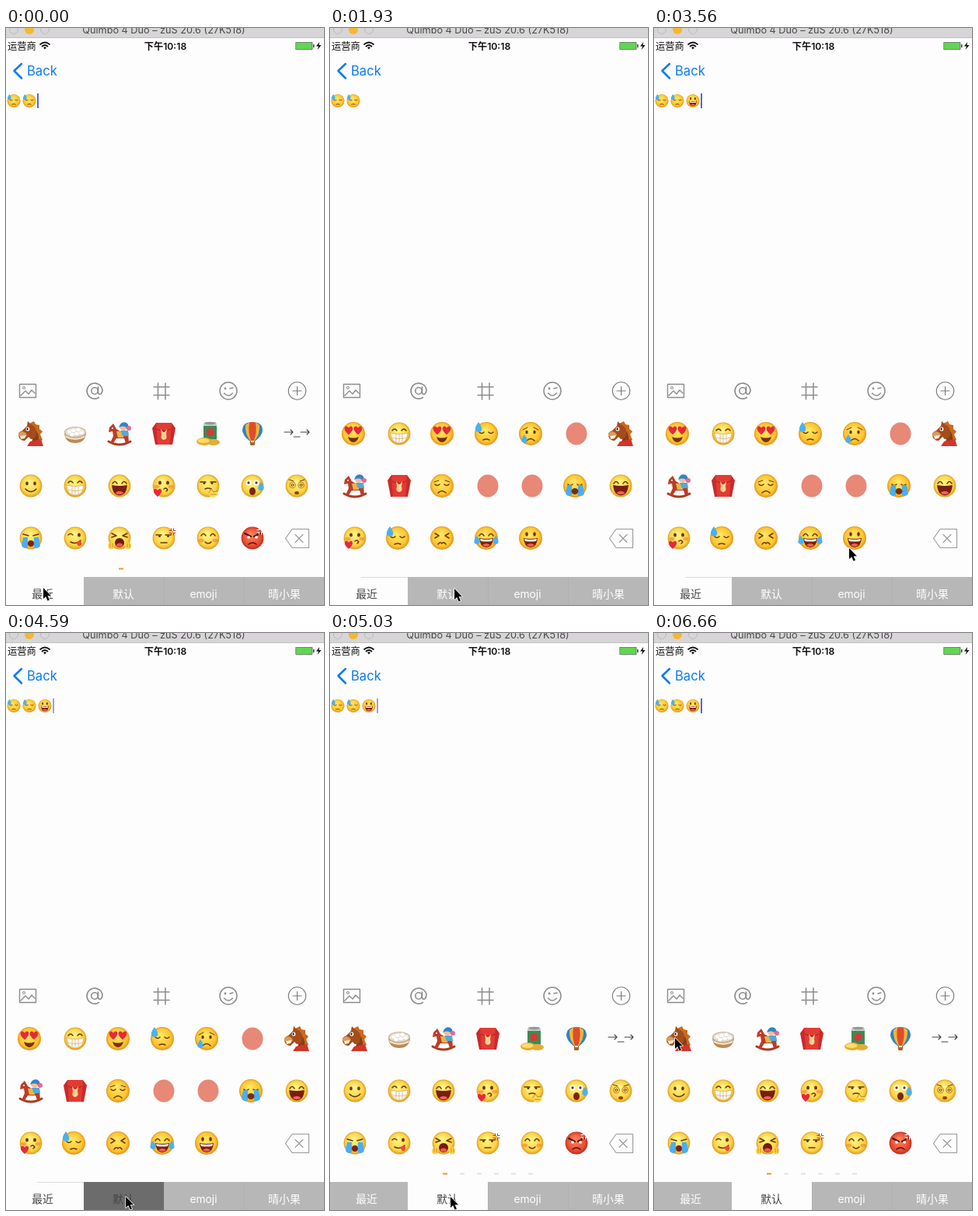
Animation of 409 by 741 pixels, one loop 8 s. Source, as an HTML page with a canvas:

```html
<!DOCTYPE html>
<html lang="zh-CN">
<head>
<meta charset="utf-8">
<style>
html, body { margin: 0; width: 100%; height: 100%; overflow: hidden; background: #fdfdfd; }
canvas { display: block; width: 409px; height: 741px; }
</style>
</head>
<body>
<canvas id="stage"></canvas>
<script>
const LOOP = 8000, TICK = 147.6;
const canvas = document.getElementById('stage');
const ctx = canvas.getContext('2d');
const ratio = window.devicePixelRatio || 1;
canvas.width = 409 * ratio;
canvas.height = 741 * ratio;

const BROWN = '#68370c', GRAY = '#8c8c8c', BLUE = '#0b7bf5';

// Drawing helpers
function fill(d, color) {
  ctx.fillStyle = color;
  ctx.fill(new Path2D(d));
}
function line(d, color = BROWN, width = 1.5) {
  ctx.strokeStyle = color;
  ctx.lineWidth = width;
  ctx.stroke(new Path2D(d));
}
function oval(x, y, rx, ry, color) {
  ctx.fillStyle = color;
  ctx.beginPath();
  ctx.ellipse(x, y, rx, ry, 0, 0, 7);
  ctx.fill();
}
function ring(x, y, r, color = GRAY, width = 1.3) {
  ctx.strokeStyle = color;
  ctx.lineWidth = width;
  ctx.beginPath();
  ctx.arc(x, y, r, 0, 7);
  ctx.stroke();
}
function rect(x, y, w, h, color) {
  ctx.fillStyle = color;
  ctx.fillRect(x, y, w, h);
}
function text(str, x, y, size, color, align = 'center', weight = 400) {
  ctx.font = `${weight} ${size}px Inter, "Noto Sans CJK SC", "Noto Sans CJK", sans-serif`;
  ctx.textAlign = align;
  ctx.fillStyle = color;
  ctx.fillText(str, x, y);
}
function at(x, y, draw, scale = 1) {
  ctx.save();
  ctx.translate(x, y);
  ctx.scale(scale, scale);
  draw();
  ctx.restore();
}

// Face parts, drawn around the origin with a radius of about 15
function ball(inner = '#fff48a', mid = '#fbd344', edge = '#dc9420', r = 14.4) {
  const g = ctx.createRadialGradient(-2, -5, 1, 0, 0, r + .4);
  g.addColorStop(0, inner);
  g.addColorStop(0.75, mid);
  g.addColorStop(1, edge);
  oval(0, 0, r, r, g);
}
const glossy = () => ball('#ffe765', '#fdc52f', '#e08c18', 15);
const pair = (x, y, rx, ry, color = BROWN) => {
  oval(-x, y, rx, ry, color);
  oval(x, y, rx, ry, color);
};
const blush = (y = 3) => pair(9, y, 3.5, 2.3, 'rgba(245,110,50,.5)');
const happyEyes = () => line('M-9-3Q-6-8-3-3M3-3Q6-8 9-3');
const flatEyes = () => line('M-9-2Q-6 1-3-2M3-2Q6 1 9-2');
const sadMouth = () => line('M-5 9Q0 4 5 9');
const heart = () => fill('M0 5C-8-1-5-6-2-5Q0-4 0-3Q0-4 2-5C5-6 8-1 0 5Z', '#e6283c');
const drop = () => fill('M0-7Q6 1 3.5 4.5Q0 7-3.5 4.5Q-6 1 0-7Z', '#4cb0ee');
const angerMark = color => line('M-4-1.5H-1.5V-4M1.5-4V-1.5H4M-4 1.5H-1.5V4M1.5 4V1.5H4', color, 1.2);
const openMouth = () => {
  fill('M-9 0Q0 2 9 0Q8 12 0 12Q-8 12-9 0Z', '#7b1d12');
  fill('M-5 9Q0 5 5 9Q0 13-5 9Z', '#ee6553');
};
const toothMouth = () => {
  openMouth();
  fill('M-8 1Q0 3 8 1L7 4Q0 5-7 4Z', '#fff');
};
const streams = () => fill('M-10-1H-4V12Q-9 15-12 10ZM10-1H4V12Q9 15 12 10Z', '#4aaef0');

const pic = {
  smile() { ball(); pair(5, -3, 1.8, 2.4); line('M-7 4Q0 11 7 4'); },
  grin() {
    ball(); line('M-9-4Q-6-8-3-4M3-4Q6-8 9-4');
    fill('M-11-1Q0 2 11-1Q10 12 0 12Q-10 12-11-1Z', '#fff');
    line('M-11-1Q0 2 11-1Q10 12 0 12Q-10 12-11-1ZM-9 5Q0 8 9 5M-4 1V11M0 1V11M4 1V11', '#d2a257', .7);
  },
  laugh() { ball(); happyEyes(); at(0, -1, openMouth, 1.1); },
  love() {
    ball(); blush(1); pair(5, -4, 2, 2.6); line('M0 4Q3 2 4 4Q6 5 3 7');
    at(-8, 9, heart);
  },
  think() {
    ball(); line('M-10-5H-3M3-5H10'); pair(5, -3.5, 1.5, 1.5); line('M-4 4Q0 2 4 4');
    fill('M1 9L4 4 7 8 12 7Q15 13 7 15Q1 15 1 9Z', '#ffdc58');
    line('M1 9L4 4 7 8 12 7M3 11H10', '#cb8020', 1);
  },
  shock() {
    ball(); pair(5, -4, 3.4, 3.8, '#fff'); pair(5, -4, 1.6, 1.8);
    oval(0, 7, 4, 5, '#7b2412'); at(11, 1, drop, .9);
  },
  dizzy() {
    ball(); line('M-10-8L-4-6M4-6L10-8', BROWN, 1);
    for (const x of [-5.5, 5.5]) { ring(x, -1, 3.8, '#b97922', 1); ring(x, -1, 1.5, BROWN, 1); }
    oval(0, 9, 3, 2, '#8c4518');
  },
  sob() { ball(); line('M-10-5L-3-3M10-5L3-3'); streams(); oval(0, 7, 4, 4, '#7c2315'); },
  tongue() {
    ball(); line('M-9-4Q-6-7-3-4'); oval(5, -4, 2, 2.6, BROWN);
    line('M-6 5Q1 9 7 3'); fill('M1 6Q5 2 8 5Q9 11 4 10Z', '#e74b45');
  },
  bawl() {
    ball(); line('M-10-6L-4-3-10-1M10-6L4-3 10-1');
    oval(0, 6, 6, 6, '#75180f'); oval(0, 9, 4, 2.5, '#e75b4c');
    for (const x of [-11, 11]) at(x, 10, () => { oval(0, 0, 4, 4.5, '#ffd449'); line('M-1-3V2M2-3V2', '#bf751f', .8); });
  },
  annoyed() {
    ball(); line('M-10-4H-3M2-4H9'); pair(5.5, -2.5, 1.5, 1.5); line('M-4 6H4');
    at(11, -8, () => angerMark('#d83932'));
  },
  shy() { ball(); happyEyes(); blush(); line('M-4 5Q0 9 4 5'); },
  furious() {
    ball('#ff8560', '#e94c32', '#b92b20'); line('M-10-6L-2-2M10-6L2-2', '#4c120c', 2);
    pair(5, -1, 2, 1.8, '#fff'); line('M-5 8Q0 4 5 8', '#4c120c');
    at(10, -9, () => angerMark('#fff'));
  },
  hearts() { glossy(); at(-6, -4, heart, 1.05); at(6, -4, heart, 1.05); fill('M-7 4Q0 7 7 4Q5 11 0 11Q-5 11-7 4Z', '#743112'); },
  sweat() { glossy(); flatEyes(); line('M-4 8Q0 6 4 8'); at(-10, -8, drop); },
  worried() { glossy(); line('M-10-5L-4-8M4-8L10-5', BROWN, 1); pair(5, -2, 1.7, 2.3); sadMouth(); at(-8, 7, drop, .85); },
  gloomy() { glossy(); line('M-10-5L-4-7M4-7L10-5', BROWN, 1); flatEyes(); sadMouth(); },
  crying() { glossy(); flatEyes(); streams(); oval(0, 7, 4.5, 4, '#743112'); },
  persevere() { glossy(); line('M-9-6L-4-3-9 0M9-6L4-3 9 0'); line('M-5 8Q-2 4 0 7Q2 4 5 8'); },
  joy() { glossy(); happyEyes(); toothMouth(); at(-12, 3, drop, .85); at(12, 3, drop, .85); },
  happy() { glossy(); pair(5, -5, 1.8, 2.8); toothMouth(); },
  blob() { oval(0, 0, 13.5, 14.5, '#e88876'); },
  horse() {
    fill('M-2-13L4-16 6-12 11-11 11-6 15-3 12 1 15 8 6 11 4-6Z', '#c96a1e');
    fill('M2-6Q11-4 10 10L0 12Q4 6 0 2Z', '#8a3d16');
    fill('M-5 16L-1 10 13 7 16 16Z', '#d3352a');
    fill('M-5-10L-4-16 0-12Q8-9 7 1Q6 7 0 7L-3 4-8 9Q-14 9-16 3Q-17-2-11-4Z', '#a44c1c');
    fill('M-11-3Q-6-2-5 2L-9 5-16 3Q-17-2-11-3Z', '#dc9a5c');
    fill('M-14 3L-6 2-8 6-13 7Z', '#fff4d6');
    oval(-4, -6, 2.4, 2.6, '#fff'); oval(-4.4, -6, 1.1, 1.4, '#251209');
  },
  bowl() {
    fill('M-14-1Q-13 12 0 12Q13 12 14-1Z', '#bd8a53');
    fill('M-13 2Q0 9 13 2L12 5Q0 11-12 5Z', '#efe1c8');
    oval(0, -2, 14, 7, '#c7b9a5');
    oval(0, -2, 12.5, 5.7, '#eee7d8');
    for (const [x, y] of [[-7, -2], [-2, -4], [4, -5], [8, -1], [2, 0], [-4, 1]]) {
      oval(x, y + .5, 3.3, 2.8, '#c9bdab'); oval(x, y, 3, 2.5, '#fff');
    }
  },
  rocker() {
    line('M-14 10Q0 18 14 10', '#aa3b23', 3);
    fill('M-13-8L-8-13-4-6 4-1 11-2 12 12H8L6 6H-4L-8 12H-12L-8 3-9-3-14-2Z', '#bd3d25');
    fill('M-4-3H6L5 5H-2Z', '#e8b64b');
    oval(5, -9, 5, 5, '#f5bc99');
    fill('M-1-8Q2-17 9-14Q14-10 10-5Q8-12-1-8Z', '#3184c8');
    fill('M1-4H11L12 3H4Z', '#55a8d6');
    oval(12, -7, 3, 3, '#e8679a');
    oval(-9, -7, 1, 1, '#fff');
  },
  packet() {
    fill('M-10-14H10L15-7 11 14H-11L-15-7Z', '#c92a2a');
    fill('M-10-14H10L8 14H-8Z', '#e33b34');
    line('M-9-6Q0-1 9-6', '#a91f20', 1);
    fill('M-3 1L-4-6-1-2 1-2 4-6 3 1Q5 7 0 8Q-5 7-3 1Z', '#f3d391');
  },
  can() {
    fill('M-6-13L-4-15H9L11-13V9H-6Z', '#c4cdc5');
    rect(-6, -10, 17, 17, '#3d8a56');
    oval(2.5, -13.5, 7, 1.7, '#8f9a92');
    oval(2.5, -2, 5, 5, '#d63b35');
    oval(7, 11, 8, 4, '#e2ad3c');
    oval(-5, 10, 10, 5, '#e9aa2d'); oval(-6, 9, 7.5, 3, '#ffdc67');
  },
  balloon() {
    fill('M-13-4Q-13-15 0-15Q13-15 13-4Q12 3 4 9H-4Q-12 3-13-4Z', '#2f83bf');
    fill('M-9-11Q-5-15 0-15Q5-15 9-11Q10 0 3 9H-3Q-10 0-9-11Z', '#f3b43a');
    fill('M-4-14Q0-16 4-14Q6-2 2 9H-2Q-6-2-4-14Z', '#df4c2b');
    line('M-3 9L-2 12M3 9L2 12', '#80501f', 1);
    fill('M-3.5 11H3.5L2.5 15H-2.5Z', '#a76528');
  },
  arrows() { line('M-16-2H-5M-8-5L-5-2-8 1M5-2H16M13-5L16-2 13 1M-4 4H4', '#444', 1.1); },
  erase() { line('M-14.5 .5L-6-11.5H15.5V12.5H-6ZM-2-4.5L8 5.5M8-4.5L-2 5.5', '#999', 1.1); },
};

const RECENT = [
  'hearts grin hearts sweat worried blob horse',
  'rocker packet gloomy blob blob crying laugh',
  'love sweat persevere joy happy - erase',
];
const STANDARD = [
  'horse bowl rocker packet can balloon arrows',
  'smile grin laugh love think shock dizzy',
  'sob tongue bawl annoyed shy furious erase',
];
const SHIFTED = /hearts|sweat|worried|gloomy|crying|persevere|joy|happy/;

function drawGrid(rows) {
  rows.forEach((row, r) => row.split(' ').forEach((name, c) => {
    if (name === '-') return;
    at(32 + c * 57 - (SHIFTED.test(name) ? 2 : 0), 521 + r * 67, pic[name]);
  }));
}

function drawHeader() {
  rect(0, 0, 409, 12, '#d7d5d7');
  rect(0, 12, 409, 1, '#c2c0c2');
  ring(10, 2, 5.5, '#bcbabc', 1);
  ring(50, 2, 5.5, '#bcbabc', 1);
  oval(30, 2, 6, 6, '#f5b731');
  text('Quimbo 4 Duo – zuS 20.6 (27K518)', 203, 7, 12.7, '#4c4a4c');

  text('运营商', 2, 28, 12.3, '#111', 'left');
  line('M44 21Q50 16 56 21M46.5 23.5Q50 20.5 53.5 23.5', '#111', 1.7);
  fill('M48 25Q50 23.5 52 25L50 27.5Z', '#111');
  text('下午10:18', 205, 28, 12.2, '#111', 'center', 600);
  rect(373, 18.5, 21, 9, '#62d653');
  line('M373 18.5H394V27.5H373Z', '#444', .6);
  rect(395, 21, 1.5, 4, '#444');
  fill('M403 18L399 23.5H402L400.5 28 405.5 22H402.5Z', '#111');

  line('M20 46L10.5 55 20 64.5', BLUE, 2.5);
  text('Back', 27, 61, 16.6, BLUE, 'left');
}

function drawToolbar() {
  line('M17.5 457.5H38.5V474.5H17.5ZM19 472L25 466 29 470 33 465 37 469', GRAY, 1.4);
  ring(23, 462, 1.5, GRAY, 1);
  ring(114, 466, 4.2, GRAY, 1.6);
  line('M118.5 461V468Q119 471 122 470Q124 468 124 465A10 10 0 1 0 119.5 474.5', GRAY, 1.6);
  line('M190 461H210M190 471.5H210M195.5 456V477M205 456V477', GRAY, 1.5);
  ring(286, 466, 11, GRAY, 1.5);
  oval(282, 463, 1.4, 1.4, GRAY);
  line('M288 463L292 462M280.5 469Q286 475 291.5 469', GRAY, 1.4);
  ring(374.5, 466, 11.2, '#777', 1.1);
  line('M369 466H380M374.5 460.5V471.5', '#777', 1.1);
}

function drawTabs(active, pressed, bordered) {
  const edges = [0, 100, 203, 306, 409];
  ['最近', '默认', 'emoji', '晴小果'].forEach((label, i) => {
    const x = edges[i], w = edges[i + 1] - x, dark = i === pressed;
    rect(x, 705, w, 36, dark ? '#6c6c6c' : i === active ? '#fdfdfd' : '#b7b7b7');
    if (i > 1) rect(x, 705, 1, 36, '#b0b0b0');
    text(label, [47, 151, 254, 358][i], 732, 13.8, dark || i === active ? '#444' : '#fff');
  });
  if (bordered) rect(40, 705, 60, 1, '#dcdcdc');
}

// Pointer stops: time, x, y
const STOPS = [
  [0, 48, 719], [290, 50, 722], [1040, 50, 722], [1900, 160, 720], [2080, 160, 720],
  [2970, 266, 666], [3260, 257, 668], [3540, 251, 668], [3700, 251, 668],
  [4440, 154, 724], [5030, 155, 724], [5320, 155, 724], [5600, 166, 725],
  [5910, 166, 725], [6640, 27, 520], [LOOP, 27, 520],
];
function drawPointer(t) {
  const i = STOPS.findIndex(s => s[0] > t);
  const [a, b] = [STOPS[i - 1], STOPS[i]];
  const u = (t - a[0]) / (b[0] - a[0]), k = u * u * (3 - 2 * u);
  at(a[1] + (b[1] - a[1]) * k, a[2] + (b[2] - a[2]) * k, () => {
    const arrow = 'M0 0V14L3.2 11 5.5 16.5 8 15.5 5.6 10.2H10Z';
    line(arrow, '#fff', 1.6);
    fill(arrow, '#000');
  });
}

// The blink restarts when a face is typed
function caretAlpha(t) {
  if (t < 870 || t >= 6600 || (t > 3260 && t < 4100)) return 1;
  const phase = (t - (t < 3500 ? 870 : 5160) + 5200) % 1040;
  return phase < 300 ? 0 : phase < 460 || phase > 830 ? .6 : 1;
}

function draw(now) {
  const step = Math.floor((now % LOOP + 6) / TICK), t = step * TICK;
  ctx.setTransform(ratio, 0, 0, ratio, 0, 0);
  ctx.lineCap = ctx.lineJoin = 'round';
  rect(0, 0, 409, 741, '#fdfdfd');
  drawHeader();

  const typed = step >= 24;
  at(10, 93.5, pic.sweat, .57);
  at(30, 93.5, pic.sweat, .57);
  if (typed) at(50, 93.5, pic.happy, .57);
  ctx.globalAlpha = caretAlpha(t);
  rect(typed ? 60 : 40, 84, 2, 19, '#4969e4');
  ctx.globalAlpha = 1;

  drawToolbar();
  const recent = step >= 4 && step < 33;
  drawGrid(recent ? RECENT : STANDARD);
  if (!recent) {
    rect(145, 693.5, 6, 2, '#e89a36');
    if (step > 4) for (let i = 1; i < 6; i++) rect(145 + i * 22, 693.5, 6, 2, '#e2e2e2');
  }
  drawTabs(step < 32 ? 0 : 1, step === 31 ? 1 : -1, step >= 8 && step < 32);
  drawPointer(Math.min(t, LOOP - 1));
}

const start = performance.now();
function loop() {
  draw(performance.now() - start);
  requestAnimationFrame(loop);
}
loop();
</script>
</body>
</html>
```
